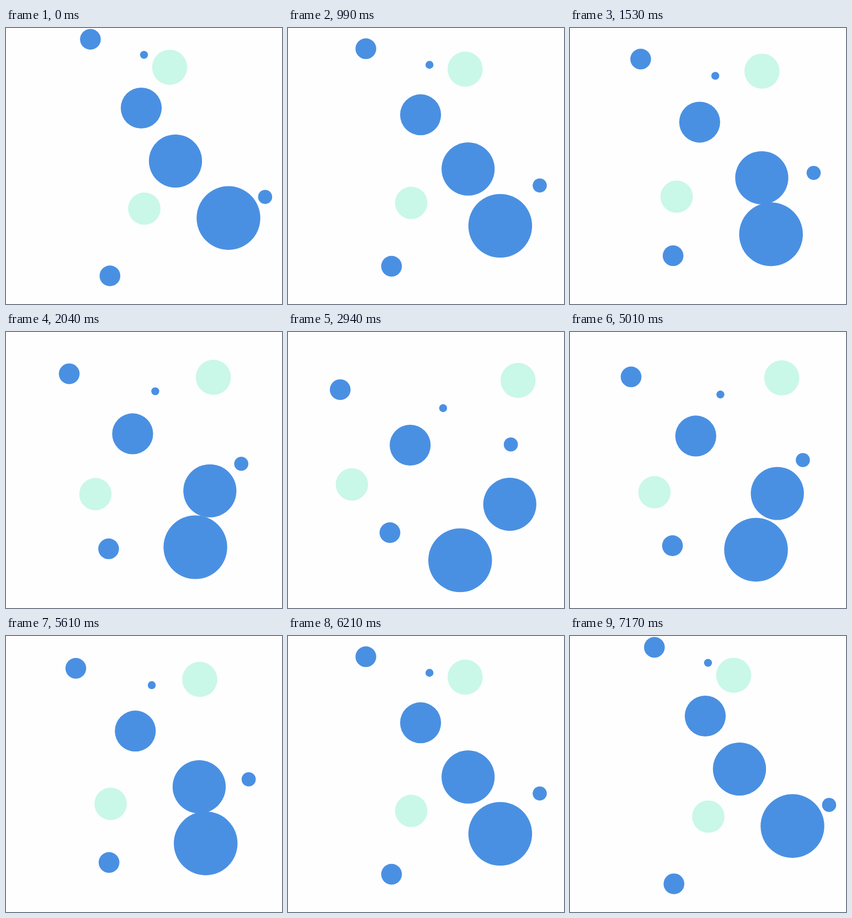
These frames come from a looping animation (500 by 500 pixels, 7.23 s). An HTML page with a canvas:

```html
<!DOCTYPE html>
<html lang="en">
<head>
<meta charset="utf-8">
<title>Drifting circles</title>
<style>
  html, body { margin: 0; width: 100%; height: 100%; overflow: hidden; background: #fefefe; }
  canvas { display: block; width: 500px; height: 500px; }
</style>
</head>
<body>
<canvas id="stage" width="500" height="500"></canvas>
<script>
const ctx = document.getElementById('stage').getContext('2d');
const LOOP = 7230, HALF = 3600, STEP = 30;
const BLUE = '#4a90e2', MINT = '#c9f7e8';

const lerp = (a, b, p) => a + (b - a) * p;
const ease = u => u * u * (3 - 2 * u);

// Out and back, eased at both ends
function progress(t) {
  return ease(1 - Math.abs(1 - Math.min(t, 2 * HALF) / HALF));
}

// A circle that drifts in a straight line between two points
function drifter(color, radius, from, to) {
  return p => {
    ctx.fillStyle = color;
    ctx.beginPath();
    ctx.arc(lerp(from.x, to.x, p), lerp(from.y, to.y, p), radius, 0, 2 * Math.PI);
    ctx.fill();
  };
}

const at = (x, y) => ({ x, y });
const drifters = [
  drifter(MINT, 31.8, at(296.5, 71.2), at(428.5, 89.3)),
  drifter(MINT, 29.3, at(250.6, 327.2), at(102.7, 271.2)),
  drifter(BLUE, 18.8, at(152.9, 20.5), at(88.9, 112.6)),
  drifter(BLUE, 7.2, at(250, 48.6), at(284, 146.6)),
  drifter(BLUE, 37.1, at(245, 145), at(219, 210.8)),
  drifter(BLUE, 48.1, at(307, 241), at(411, 319)),
  drifter(BLUE, 57.7, at(403, 344.3), at(303, 420.3)),
  drifter(BLUE, 12.8, at(469.4, 306), at(397.3, 193.8)),
  drifter(BLUE, 18.8, at(188.3, 449), at(184.3, 355.2))
];

function draw(time) {
  const t = Math.floor((time % LOOP) / STEP) * STEP;
  const p = progress(t);
  ctx.fillStyle = '#fefefe';
  ctx.fillRect(0, 0, 500, 500);
  drifters.forEach(paint => paint(p));
}

const start = performance.now();
function tick() {
  draw(performance.now() - start);
  requestAnimationFrame(tick);
}
tick();
</script>
</body>
</html>
```
